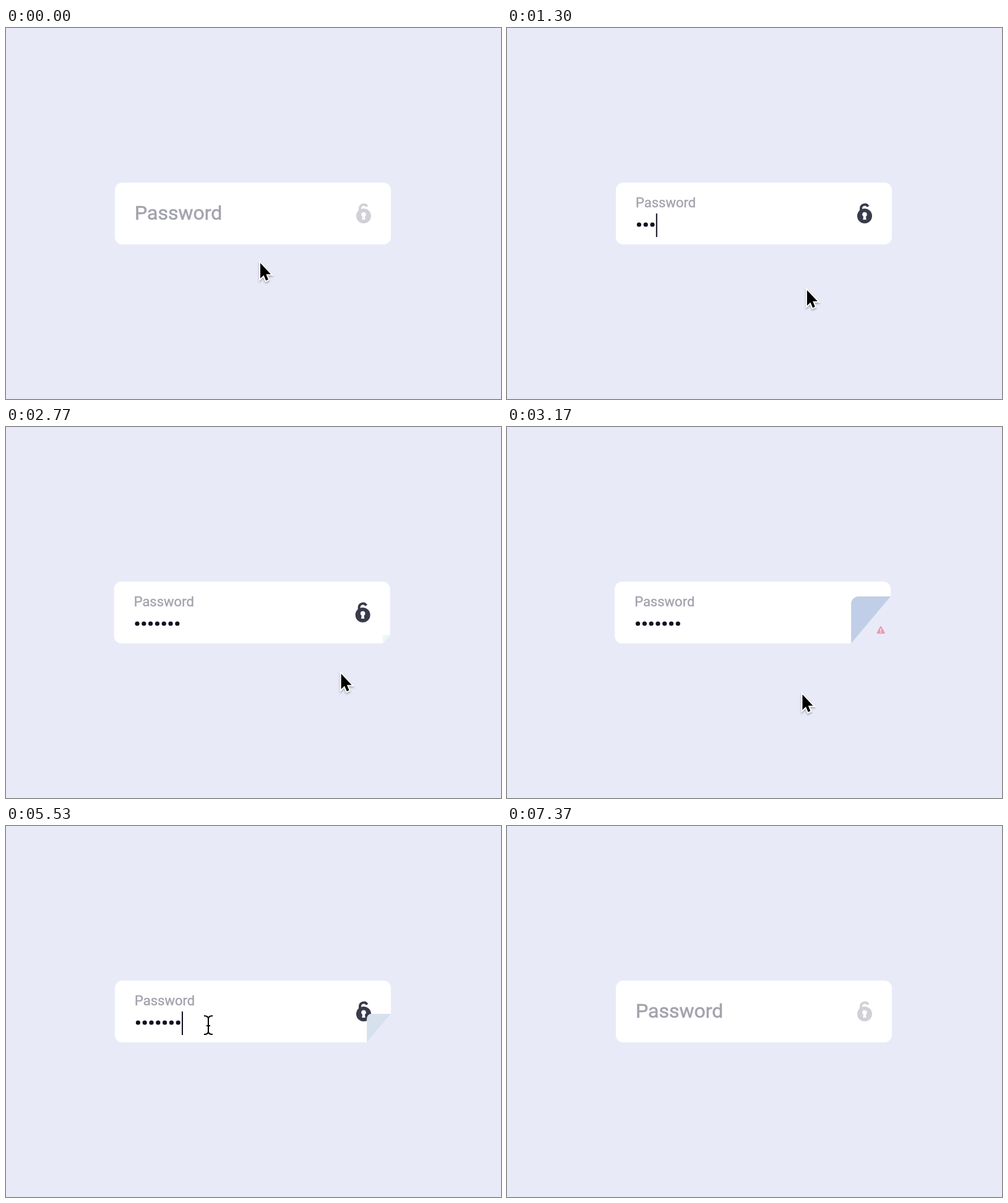
An HTML page that plays this animation: 800x600 px, repeating every 7.86 s.

```html
<!DOCTYPE html>
<html lang="en">
<head>
<meta charset="utf-8">
<title>Password field</title>
<style>
  html, body { margin: 0; width: 100%; height: 100%; overflow: hidden; background: #e8ebf7; }
  svg { display: block; width: 800px; height: 600px; }
  text { font: 32px Roboto, Arial, sans-serif; }
</style>
</head>
<body>
<svg viewBox="0 0 800 600">
  <rect width="800" height="600" fill="#e8ebf7"/>
  <g id="card">
    <rect x="176" y="250" width="446" height="100" rx="12" fill="#fff"/>
    <text id="label" fill="#a2a3ad" stroke="#a2a3ad" stroke-width=".6">Password</text>
    <g id="dots" fill="#0f1020"></g>
    <rect id="caret" width="2" height="38" fill="#0f1020"/>
    <g id="lock">
      <path d="M572 298V292A6.2 6.2 0 0 1 583.6 288.8" fill="none" stroke="currentColor" stroke-width="4"/>
      <circle cx="578" cy="304" r="12" fill="currentColor"/>
      <path d="M576.2 303h3.6l.8 7h-5.2z" fill="#fff"/>
      <circle cx="578" cy="301.5" r="3.8" fill="#fff"/>
    </g>
    <path id="hole" fill="#e8ebf7"/>
    <path id="flap"/>
    <g id="warning">
      <path d="M606 317L618.5 339.5H593.5Z" fill="#ea3553" stroke="#ea3553" stroke-width="5" stroke-linejoin="round"/>
      <path d="M604 324h4v8h-4zM604 334h4v4h-4z" fill="#fff"/>
    </g>
  </g>
  <g id="arrow" style="filter:drop-shadow(0 2px 1.5px rgba(0,0,0,.3))">
    <path d="M0 0V25L5.5 19.8L9.2 28.5L12.9 26.8L9.3 18.2H17Z" stroke="#fff" stroke-width="4" paint-order="stroke"/>
  </g>
  <g id="beam" fill="none">
    <path id="beamEdge" stroke="#fff" stroke-width="4"/>
    <path id="beamCore" stroke="#000" stroke-width="2"/>
  </g>
</svg>
<script>
const LOOP = 7860, LENGTH = 7;
const $ = id => document.getElementById(id);
const set = (el, attrs) => { for (const k in attrs) el.setAttribute(k, attrs[k]); };
const show = (el, on) => set(el, { visibility: on ? 'visible' : 'hidden' });
const clamp = (v, max = 1) => Math.min(max, Math.max(0, v));
const mix = (a, b, p) => a + (b - a) * p;
const smooth = p => p * p * (3 - 2 * p);
const ramp = (t, from, to) => smooth(clamp((t - from) / (to - from)));
const mixColor = (a, b, p) => `rgb(${a.map((v, i) => Math.round(mix(v, b[i], p)))})`;
const bezier = (a, b, c, d, p) => {
  const q = 1 - p;
  return q * q * q * a + 3 * q * q * p * b + 3 * q * p * p * c + p * p * p * d;
};

// Pointer sweeps, each a curve that starts where the last one ended
const home = [411, 380];
const sweeps = [
  { from: 30, to: 330, bend: [[380, 370], [270, 330]], end: [261, 327] },
  { from: 600, to: 2130, bend: [[527, 575], [513, 309]], end: [579, 358] },
  { from: 2560, to: 3670, bend: [[510, 446], [462, 446]], end: [395, 413] },
  { from: 4270, to: 4700, bend: [[364, 386], [345, 346]], end: [327, 322] },
  { from: 6630, to: 7230, bend: [[420, 330], [600, 402]], end: [711, 402] }
];

function pointerAt(t) {
  let at = home;
  for (const { from, to, bend: [b, c], end } of sweeps) {
    if (t < from) break;
    const p = clamp((t - from) / (to - from));
    at = at.map((v, k) => bezier(v, b[k], c[k], end[k], p));
  }
  return at;
}

// Ten swings that double up to 8 px and halve again
function swing(i) {
  const rank = Math.min(i, 10 - i);
  return rank > 0 ? (-1) ** i * Math.min(8, 2 ** rank) : 0;
}

function shakeAt(t) {
  const p = clamp((t - 2530) / 700) * 10, i = Math.floor(p);
  return mix(swing(i), swing(i + 1), smooth(p - i));
}

// Keys pressed since a time, at a steady pace
const keys = (t, from, pace) => clamp(Math.floor((t - from) / pace) + 1, LENGTH);

const beamPath = 'M-7 -15Q0 -15 0 -10Q0 -15 7 -15M-7 15Q0 15 0 10Q0 15 7 15M0 -10V10M-3 1H3';
set($('beamEdge'), { d: beamPath });
set($('beamCore'), { d: beamPath });
const dots = Array.from({ length: LENGTH }, (_, i) => {
  const dot = document.createElementNS('http://www.w3.org/2000/svg', 'circle');
  set(dot, { cx: 213.4 + 10.8 * i, cy: 318, r: 3.6 });
  return $('dots').appendChild(dot);
});

function drawFold(p) {
  const x = 622 - 64 * p, y = 350 - 76 * p, r = 12 * p;
  for (const part of [$('hole'), $('flap')]) show(part, p > 0);
  set($('hole'), { d: `M${x} 350L622 ${y}H624V352H${x}Z` });
  set($('flap'), {
    d: `M${x} 350V${y + r}A${r} ${r} 0 0 1 ${x + r} ${y}H622Z`,
    fill: mixColor([250, 255, 250], [193, 206, 231], p)
  });
}

function drawField(t) {
  const raised = ramp(t, 570, 840) - ramp(t, 7060, 7340);
  set($('label'), {
    transform: `translate(208 ${mix(310, 290, raised)}) scale(${mix(1, .6875, raised)})`
  });
  set($('lock'), { color: mixColor([208, 209, 215], [57, 58, 75], raised) });

  const count = keys(t, 1040, 110) - keys(t, 5900, 21);
  dots.forEach((dot, i) => show(dot, i < count));

  const focused = t >= 570 && t < 2200 || t >= 4900 && t < 7060;
  const low = !count && (t < 5900 || t >= 6240);
  show($('caret'), focused);
  set($('caret'), { x: count ? 208.4 + 10.8 * count : 208, y: low ? 302 : 300 });
}

function drawWarning(p) {
  show($('warning'), p > 0);
  set($('warning'), {
    transform: `translate(606 328) scale(${p}) translate(-606 -328)`,
    opacity: p
  });
}

function drawPointer(t) {
  const [x, y] = pointerAt(t);
  const inside = x > 176 && x < 622 && y > 250 && y < 350;
  const visible = t < 7370;
  show($('arrow'), visible && !inside);
  show($('beam'), visible && inside);
  for (const pointer of [$('arrow'), $('beam')]) set(pointer, { transform: `translate(${x} ${y})` });
}

function draw(t) {
  set($('card'), { transform: `translate(${shakeAt(t)})` });
  drawField(t);
  drawFold(ramp(t, 2650, 3090) - ramp(t, 5330, 5800));
  drawWarning(ramp(t, 3070, 3290) - ramp(t, 5070, 5330));
  drawPointer(t);
}

const start = performance.now();
function tick() {
  draw((performance.now() - start) % LOOP);
  requestAnimationFrame(tick);
}
tick();
</script>
</body>
</html>
```
